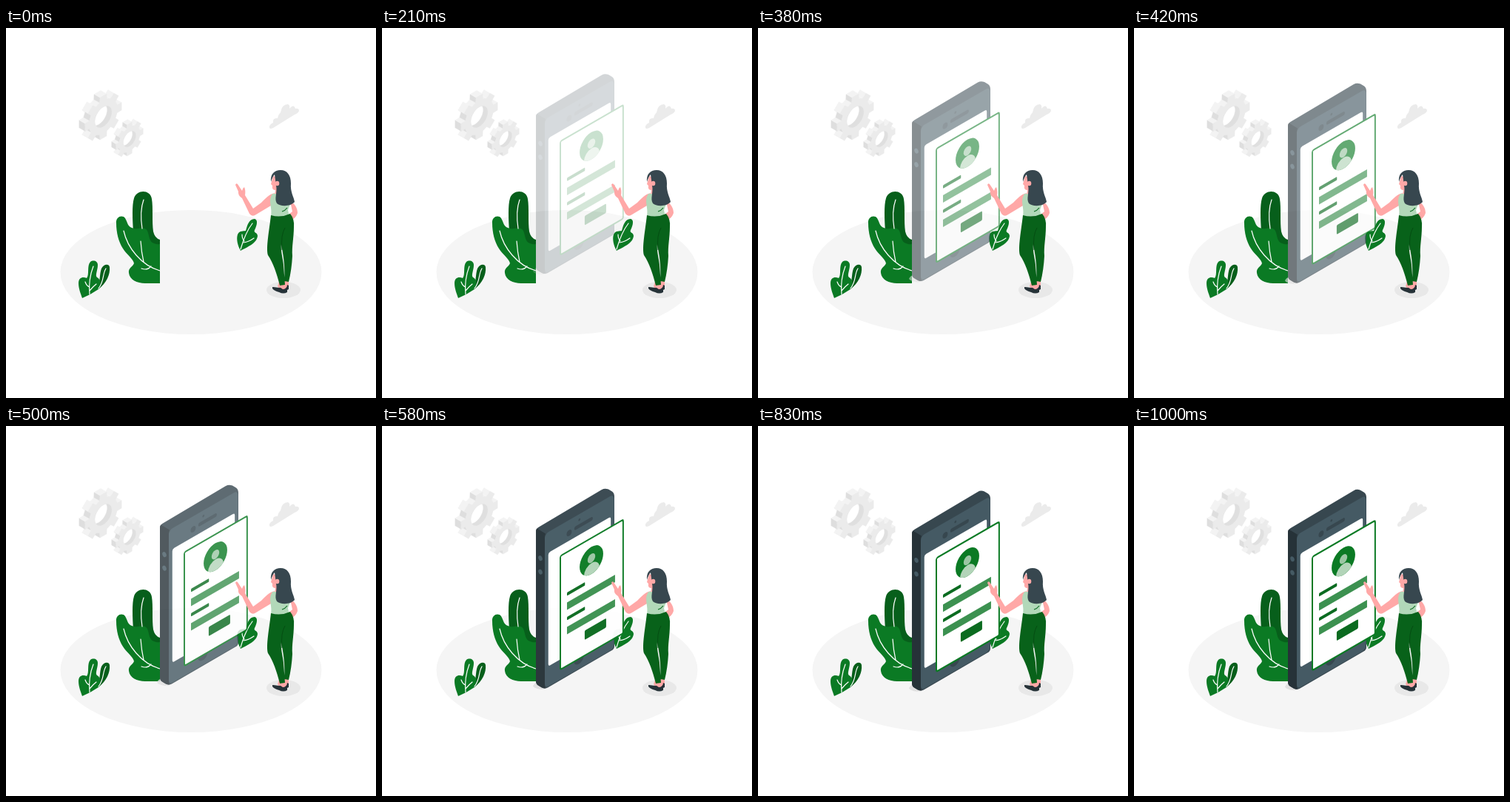
An HTML page that plays this animation: 500x500 px, repeating every 1040 ms.

```html
<!DOCTYPE html>
<html lang="en">
<head>
<meta charset="utf-8">
<title>Sign-up form</title>
<style>
  html, body { margin: 0; height: 100%; overflow: hidden; background: #fff; }
  svg { display: block; width: 100vw; height: 100vh; }
  .vein { fill: none; stroke: #fff; stroke-width: 1.2; stroke-linecap: round; }
</style>
</head>
<body>
<svg viewBox="0 0 500 500">
  <clipPath id="face"><circle cx="48.5" cy="30.3" r="18.4"/></clipPath>

  <ellipse cx="250" cy="330" rx="176.5" ry="84" fill="#f5f5f5"/>
  <g id="gears"></g>
  <path fill="#ebebeb" d="M356 135Q355 131 361 128Q360 121 367 122Q368 117 371 114Q373 103 381 103Q384 104 383 109Q389 102 391 109Q396 108 396 112Q395 115 390 117L361 135Q357 137 356 135Z"/>

  <!-- large plant -->
  <path fill="#075f1b" d="M172 275C171 258 170 240 173 230C177 218 195 218 197 231C199 243 197 262 199 275Q201 284 208 286V300H180Z"/>
  <path fill="#0b7a24" d="M149 264C148 255 157 252 161 257C165 264 164 269 173 271C181 272 187 268 191 274C194 281 193 289 200 291Q204 293 208 292V345H188C177 345 167 340 166 331C165 324 171 323 173 318C172 312 163 306 158 298C152 289 149 276 149 264Z"/>
  <path class="vein" d="M186 232C182 243 182 258 184 271M159 274C164 297 183 321 208 328M182 288Q183 303 186 316M183 325Q191 328 196 322"/>

  <!-- small plants -->
  <path fill="#075f1b" d="M122 352C128 345 126 332 129 325C132 319 139 318 140 323C141 333 136 344 125 353Z"/>
  <path fill="#0b7a24" d="M103 365C101 359 98 352 98 345C98 337 104 336 109 338C113 334 109 321 114 316C118 313 124 315 124 320C124 328 120 334 123 337C128 339 129 348 125 353Q115 360 103 365Z"/>
  <path class="vein" d="M118 322Q111 340 113 360M107 343Q109 349 113 350M122 346Q118 349 113 355M135 325C130 333 133 342 125 352"/>
  <path fill="#0b7a24" d="M317 301C313 294 311 285 313 279C316 273 321 275 324 274C326 267 328 258 336 258C341 259 339 267 336 273C334 277 340 276 340 281C339 291 326 296 317 301Z"/>
  <path class="vein" d="M333 264C326 273 321 285 317 299M319 279Q319 285 322 288M335 284Q328 289 321 290"/>

  <g id="phone">
    <path fill="#e0e0e0" d="M204 353Q205 349 212 347L223 356Q214 359 206 355Z"/>
    <path fill="#37474f" d="M208 144Q208 140 212 138L297 87.500Q301 85 306 87L311 90Q314 92 314 97V299Q314 303 310 305L224 355Q220 357 216 355L211 352Q208 350 208 346Z"/>
    <path fill="#263238" d="M208 144Q208 141 209.500 140L221 147Q220 149 220 152V350Q220 354 221 356Q218 356 216 355L211 352Q208 350 208 346Z"/>
    <g transform="matrix(.866 -.5 0 1 220 147.500)">
      <rect width="108" height="208.500" rx="6" fill="#455a64"/>
      <rect x="5.500" y="28" width="97.500" height="153.500" rx="3" fill="#fff"/>
      <g fill="#37474f">
        <circle cx="38" cy="17.500" r="4"/>
        <circle cx="54" cy="7.500" r="1.600"/>
        <rect x="46" y="13.500" width="29" height="5" rx="2.500"/>
        <circle cx="53" cy="194" r="8"/>
      </g>
    </g>
    <g fill="#455a64">
      <ellipse cx="214" cy="180" rx="2.600" ry="3.600" transform="rotate(-20 214 180)"/>
      <ellipse cx="214" cy="198.500" rx="2.600" ry="3.600" transform="rotate(-20 214 198.500)"/>
    </g>
    <g transform="matrix(.866 -.5 0 1 241 177)" fill="#0b6b20">
      <rect width="98" height="153.500" rx="2.500" fill="#fff" stroke="#0b7a24" stroke-width="2.300"/>
      <circle cx="48.500" cy="30.300" r="18.400" fill="#0b7a24"/>
      <g clip-path="url(#face)" fill="#b2d4b8">
        <circle cx="48.500" cy="27.300" r="6" fill="#9bc6a3"/>
        <circle cx="49" cy="46" r="12.200"/>
      </g>
      <rect x="10.400" y="54.500" width="28" height="4.500" rx="1"/>
      <rect x="10.400" y="68" width="75" height="10" fill="#3c9150"/>
      <rect x="10.400" y="87.500" width="28" height="4.500" rx="1"/>
      <rect x="10.400" y="101" width="75" height="10" fill="#3c9150"/>
      <rect x="38" y="120" width="33.500" height="12.500" rx="1.500"/>
    </g>
  </g>

  <!-- woman -->
  <ellipse cx="375" cy="354" rx="23" ry="11" fill="#e8e8e8"/>
  <g fill="#ffa8a7">
    <path d="M370 340H382V352L372 355L367 349Z"/>
    <path d="M363 223C356 224 350 231 345 236L334 244L323 226Q324 219 322 215Q320 216 319 220L313 211Q311 209 310 212L314 221Q313 226 319 230L329 251Q333 256 338 252L358 240Z"/>
    <path d="M384 234C390 237 394 243 394 250Q392 256 387 259L382 252L387 248Z"/>
    <path d="M361 200L358 211L360 213Q359 219 364 219L363 226L372 232L376 205Z"/>
  </g>
  <path fill="#263238" d="M360 350C365 350 372 352 378 351Q380 350 380 347L382 348V353L380 354V357Q375 360 369 357Q362 355 360 352Z"/>
  <path fill="#ffa8a7" d="M367 348Q373 346 379 348Q379 353 374 353Z"/>
  <path fill="#b2d8b9" d="M360 224L368 224L384 238L381 246Q382 251 383 255Q370 259 358 254C360 244 355 236 358 228Z"/>
  <path fill="none" stroke="#0b6b20" stroke-width="1.200" d="M373 248Q377 247 380 243"/>
  <path fill="#08621a" d="M358 253Q371 257 384 251Q390 258 389 269C389 283 386 296 387 308Q386 327 382 343L376 342C377 329 376 315 374 304L372 292C371 301 374 311 375 320Q376 334 377 347L370 348C366 332 361 317 354 307C351 297 356 272 358 253Z"/>
  <path fill="none" stroke="#044d12" d="M377 270Q371 280 373 300"/>
  <path fill="#37474f" d="M358 208C357 197 363 192 371 192C380 192 385 199 385 210C384 222 389 228 390 235C384 242 370 241 366 237C362 231 367 222 365 213Q364 205 363 198Q360 201 358 208Z"/>
  <ellipse cx="366.500" cy="210" rx="2.800" ry="3.300" fill="#ffa8a7"/>
</svg>
<script>
  const phone = document.getElementById('phone');
  const pts = list => list.map(p => p.map(v => v.toFixed(1)).join()).join(' ');
  const poly = (list, fill) => `<polygon points="${pts(list)}" fill="${fill}" stroke="${fill}" stroke-width=".3"/>`;

  // Extruded eight-tooth wheel standing in the phone's plane
  function gear(cx, cy, r, depth) {
    const dx = -depth, dy = -depth * .577;
    const iso = (a, s) => [cx + .866 * s * Math.cos(a), cy + s * Math.sin(a) - .5 * s * Math.cos(a)];
    const back = ([x, y]) => [x + dx, y + dy];
    const rim = [];
    for (let i = 0; i < 8; i++)
      for (const [a, s] of [[-.25, .77], [-.18, 1], [.18, 1], [.25, .77]])
        rim.push(iso(i * Math.PI / 4 + a, r * s));
    let sides = '';
    rim.forEach((p, i) => {
      const q = rim[(i + 1) % rim.length];
      const nx = q[1] - p[1], ny = p[0] - q[0];
      if (nx * dx + ny * dy > 0)
        sides += poly([p, q, back(q), back(p)], -ny > Math.abs(nx) * .4 ? '#f3f3f3' : '#dedede');
    });
    const hole = Array.from({ length: 40 }, (_, i) => iso(i * Math.PI / 20, r * .45));
    const id = 'hole' + r;
    return sides + poly(rim, '#ebebeb') + poly(hole, '#dfdfdf') +
      `<clipPath id="${id}"><polygon points="${pts(hole)}"/></clipPath>` +
      `<g clip-path="url(#${id})">${poly(hole.map(([x, y]) => [x + dx * .8, y + dy * .6]), '#fff')}</g>`;
  }
  document.getElementById('gears').innerHTML = gear(131.5, 120, 29, 8) + gear(167, 150, 21.5, 6);

  // Drop in while fading, then one gentle dip, at 24 pictures a second
  function draw(now) {
    const t = Math.floor((now % 1040 + 4) * .024) / .024;
    const p = Math.min(1, Math.max(0, (t - 100) / 500));
    const dip = t > 600 ? 1.9 * Math.sin(Math.PI * (t - 600) / 440) ** 2 : 0;
    phone.setAttribute('opacity', t < 124 ? 0 : p);
    phone.setAttribute('transform', `translate(0 ${30 * (p - 1) + dip - .4})`);
  }
  const start = performance.now();
  function tick() {
    draw(performance.now() - start);
    requestAnimationFrame(tick);
  }
  tick();
</script>
</body>
</html>
```
